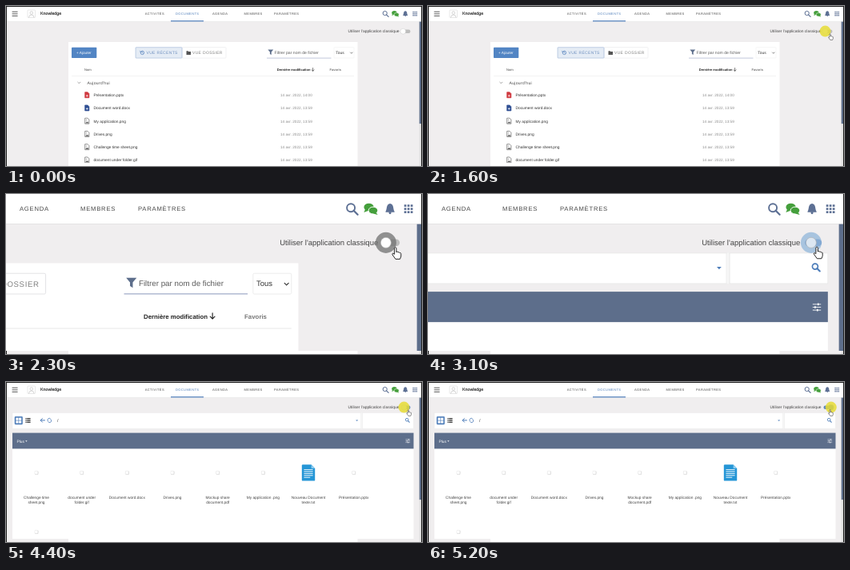
An HTML page for the animation above (6.2 s loop, 520 by 200 pixels).

```html
<!DOCTYPE html>
<html lang="fr">
<head>
<meta charset="utf-8">
<title>Documents</title>
<style>
html, body { margin: 0; width: 100%; height: 100%; overflow: hidden; background: #f0eeef; }
svg { display: block; width: 520px; height: 200px; }
text { font-family: "Liberation Sans", Arial, sans-serif; white-space: pre; text-rendering: geometricPrecision; }
.line { fill: none; stroke-linecap: round; stroke-linejoin: round; }
</style>
</head>
<body>
<svg id="stage" viewBox="0 0 520 200" xmlns="http://www.w3.org/2000/svg"></svg>
<script>
const SLATE = '#5d6e8b', BLUE = '#4c7cb9', INK = '#333', ICON = '#5d7094', PAGE = '#f0eeef';

const rect = (x, y, w, h, fill, more = '') =>
  `<rect x="${x}" y="${y}" width="${w}" height="${h}" fill="${fill}" ${more}/>`;
const dot = (x, y, r, fill, more = '') => `<circle cx="${x}" cy="${y}" r="${r}" fill="${fill}" ${more}/>`;
const text = (x, y, size, s, fill = INK, more = '') =>
  `<text x="${x}" y="${y}" font-size="${size}" fill="${fill}" ${more}>${s}</text>`;
const line = (d, color, w = 0.6) => `<path class="line" d="${d}" stroke="${color}" stroke-width="${w}"/>`;
const shape = (d, fill, more = '') => `<path d="${d}" fill="${fill}" ${more}/>`;
const box = (x, y, w, h, fill, stroke) =>
  rect(x, y, w, h, fill, `rx="0.8" stroke="${stroke}" stroke-width="0.5"`);
const spaced = n => `letter-spacing="${n}"`;
const lens = (x, y, r, color, w) =>
  line(`M${x + r * 0.7} ${y + r * 0.7}l${r} ${r}`, color, w * 1.2) +
  dot(x, y, r, 'none', `stroke="${color}" stroke-width="${w}"`);

function header() {
  let s = rect(0, 0, 520, 19.3, '#fff') + rect(0, 19.3, 520, 0.4, '#e0e0e0');
  for (const y of [7.2, 9.8, 12.4]) s += line(`M8 ${y}h6.2`, '#333', 0.8);
  s += box(27, 5, 9.5, 9.5, '#fff', '#d0d0d0') + dot(31.8, 8.6, 1.8, 'none', 'stroke="#aaa" stroke-width=".5"') +
    line('M28.6 14q0-3 3.2-3t3.2 3', '#aaa', 0.5);
  s += text(43, 11.4, 5.3, 'Knowledge', '#222', 'stroke="#222" stroke-width=".15"');
  const tabs = [[173.7, 'ACTIVITÉS'], [212, 'DOCUMENTS'], [258, 'AGENDA'], [297.6, 'MEMBRES'], [335.1, 'PARAMÈTRES']];
  for (const [x, name] of tabs)
    s += text(x, 11, 4, name, name === 'DOCUMENTS' ? BLUE : '#4a4a4a', spaced(0.4));
  s += rect(206, 18.2, 41, 1.2, BLUE);
  s += lens(473.7, 9, 2.6, ICON, 1);
  s += '<g fill="#459f3c"><ellipse cx="485.4" cy="8.6" rx="3.2" ry="2.5"/><path d="M483 10l-.8 2 2.6-1z"/>' +
    '<ellipse cx="488.2" cy="10.7" rx="3" ry="2.3" stroke="#fff" stroke-width=".5"/><path d="M490 12l1.2 1.5-3-.7z"/></g>';
  s += shape('M499.2 6.3c-2.800.5-1.700 3.500-2.900 5.100v.5h5.800v-.5c-1.200-1.600-.1-4.600-2.900-5.100z', ICON) +
    dot(499.2, 12.3, 0.8, ICON);
  for (let i = 0; i < 9; i++)
    s += rect(508.4 + i % 3 * 2.1, 6.9 + (i / 3 | 0) * 2.1, 1.4, 1.4, ICON);
  return s + text(427.4, 33.3, 4.95, 'Utiliser l\'application classique', '#444');
}

function fileIcon(y, color, photo) {
  let s = shape(`M98.7 ${y - 3.5}h3.4l1.8 1.8v5.2h-5.2z`, photo ? '#fff' : color,
    `stroke="${color}" stroke-width=".7"`);
  return s + (photo
    ? shape(`M99.3 ${y + 2.8}l1.5-2.3 1 1 .8-.8.8 2.1z`, color) + dot(100.4, y - 1.2, 0.5, color)
    : line(`M100.3 ${y + 1}h2M101.3 ${y}v2`, '#fff', 0.7));
}

function recent() {
  let s = rect(78, 45, 361.5, 155, '#fff');
  s += rect(82, 51.8, 31.3, 13.3, '#5285c4', 'rx="0.8"') + text(88, 60.1, 4.7, '+ Ajouter', '#fff');
  s += box(220, 51.7, 55, 13.4, '#fff', '#e2e2e4') + box(162, 51.7, 58, 13.4, '#e5ecf5', '#8aa6cf');
  s += dot(170.4, 58.4, 2.2, 'none', `stroke="${BLUE}" stroke-width=".7"`) +
    line('M170.4 57v1.5l1 .6M167.5 56.2l.5 1.6 1.5-.4', BLUE, 0.5);
  s += text(175.5, 60.2, 5, 'VUE RÉCENTS', '#6f90bf', spaced(0.33));
  s += shape('M225.5 56.3h2l.7.8h2.8v3.9h-5.5z', '#555') + text(233, 60.2, 5, 'VUE DOSSIER', '#808080', spaced(0.33));
  s += shape('M327.4 54.6h6.8l-2.5 3v3.5l-1.8-1.2v-2.3z', SLATE);
  s += text(335.6, 60, 5.1, 'Filtrer par nom de fichier', '#5c5c5c') + rect(326, 64.8, 80.5, 0.5, '#8593b8');
  s += box(410, 51.7, 25, 13.4, '#fff', '#ececec') + text(412.2, 60.1, 4.95, 'Tous') +
    line('M430.5 58l1.3 1.3 1.3-1.3', INK);
  s += text(98, 81, 4.1, 'Nom', '#444');
  s += text(338.8, 81, 4.05, 'Dernière modification', '#222', 'font-weight="bold"') +
    line('M383.6 77.5v3.8m-1.500-1.500l1.500 1.500 1.500-1.500', '#222');
  s += text(404.4, 81, 4.1, 'Favoris', '#777', 'font-weight="bold"') + rect(82, 87.3, 353, 0.4, '#e0e0e0');
  s += line('M89.8 95.2l1.500 1.500 1.500-1.500', '#666') + text(101.5, 97.8, 5.1, 'Aujourd\'hui', '#444', spaced(0.28));
  const rows = [
    ['Présentation.pptx', '14:00', '#d0383f'],
    ['Document word.docx', '13:59', '#2f4f93'],
    ['My application.png', '13:59'], ['Drives.png', '13:59'],
    ['Challenge time sheet.png', '13:59'], ['document under folder.gif', '13:59']
  ];
  rows.forEach(([name, hour, color], i) => {
    const y = 111.2 + i * 16.25;
    s += fileIcon(y, color || '#666', !color) + text(109.5, y + 1.8, 4.85, name, '#333') +
      text(343, y + 1.9, 4.65, `14 avr. 2022, ${hour}`, '#8a8a8a');
  });
  return s;
}

function classic() {
  let s = rect(8, 38.5, 501.5, 19.8, '#fff', 'stroke="#e6e6e6" stroke-width=".4"');
  s += rect(443.3, 38.5, 0.4, 19.8, '#e0e0e0') + rect(443.7, 38.3, 1.6, 20.2, '#f6f6f6') +
    rect(445.3, 38.5, 0.4, 19.8, '#e0e0e0');
  s += box(11, 43.3, 9.6, 9.6, BLUE, BLUE);
  for (let i = 0; i < 4; i++) s += rect(12.4 + i % 2 * 3.7, 44.7 + (i >> 1) * 3.7, 3.1, 3.1, '#fff');
  for (const y of [45.7, 48, 50.3]) s += rect(24.4, y - 0.7, 1.3, 1.4, '#444') + rect(26.2, y - 0.7, 4.4, 1.4, '#444');
  s += line('M48.5 47.9h-5.3m2.3-2.3l-2.3 2.3 2.3 2.3', BLUE, 1);
  s += line('M52.2 48.7a2.2 2.2 0 0 1 3.8-2.3M56.4 47.3a2.2 2.2 0 0 1-3.8 2.3', BLUE, 0.8);
  s += text(64, 50, 5.3, '/') + shape('M437.2 47.4h3l-1.5 1.7z', BLUE) + lens(501.2, 47.2, 1.8, BLUE, 0.9);
  s += rect(8, 83, 501.5, 117, '#fff') + rect(8, 63.6, 501.5, 19.8, SLATE);
  s += text(13.5, 75.8, 4.9, 'Plus', '#fff') + shape('M24.2 73.3h2.4l-1.2 1.4z', '#fff');
  [71.8, 73.7, 75.6].forEach((y, i) => {
    s += line(`M499.8 ${y}h5`, '#fff', 0.45) + rect([502.8, 500.8, 502.3][i], y - 0.7, 0.8, 1.4, '#fff');
  });
  const files = [['Challenge time', 'sheet.png'], ['document under', 'folder.gif'], ['Document word.docx'], ['Drives.png'],
    ['Mockup share', 'document.pdf'], ['My application .png'], ['Nouveau Document', 'texte.txt'], ['Présentation.pptx']];
  const blank = (x, y) => rect(x - 2, y - 1.7, 4.4, 4.2, '#d4d4d4', 'rx=".7"') +
    rect(x - 2.1, y - 2, 3.9, 3.9, '#fff', 'rx=".7" stroke="#dedede" stroke-width=".4"');
  files.forEach((names, i) => {
    const x = 38 + i * 56.67;
    s += i === 6 ? note(x) : blank(x, 113.3);
    names.forEach((n, k) => s += text(x, 146 + k * 5.5, 4.8, n, '#444', 'text-anchor="middle"'));
  });
  return s + blank(38, 187.3);
}

function note(x) {
  let s = shape(`M${x - 8.2} 104.5q0-1.2 1.2-1.2h10.6l4.6 4.6v14.5q0 1.2-1.2 1.2h-14q-1.2 0-1.2-1.2z`, '#2596d6') +
    shape(`M${x + 3.6} 103.3v4.6h4.6z`, '#8ccbf0');
  for (let i = 0; i < 5; i++) s += line(`M${x - 5.2} ${109.6 + i * 2.4}h${i === 4 ? 7 : 10.4}`, '#fff', 0.9);
  return s;
}

const scrollbar = rect(516.7, 19.6, 3.3, 180.4, '#e2e2e2') + rect(516.7, 19.6, 3.3, 127.5, SLATE);

const hand = shape('M0 .6C.1-.3 1.4-.3 1.5.6V3.6l.3-.4q.8-.2 1 .5.9-.4 1.2.4.9-.2 1.1.6v2.2L4.3 8.9H.9L-1.5 5.5q-.3-.9.5-1L0 5.2z',
  '#fff', 'stroke="#222" stroke-width=".6" stroke-linejoin="round" transform="scale(.85)"');
const arrow = shape('M0 0v8.2l1.9-1.7 1.3 3 1.4-.6-1.3-2.9h2.7z', '#222', 'stroke="#fff" stroke-width=".6"');

// The zoomed view leaves the last column and the bottom strip alone.
document.getElementById('stage').innerHTML =
  '<clipPath id="view"><rect width="519" height="196"/></clipPath>' +
  rect(0, 0, 520, 200, PAGE) + rect(78, 196, 361.5, 4, '#fff') + rect(516.7, 196, 2.3, 4, '#e2e2e2') +
  `<g clip-path="url(#view)"><g id="zoom">${rect(0, 0, 520, 200, PAGE)}` +
  `${header()}<g id="recent">${recent()}</g><g id="classic">${classic()}</g>${scrollbar}` +
  rect(494.5, 29.4, 11, 4.6, '#c2c2c2', 'id="track" rx="2.3"') +
  dot(0, 31.7, 6.8, 'none', 'id="ripple" opacity=".75"') +
  dot(0, 31.7, 3.4, '#fff', 'id="knob" stroke="#aaa" stroke-width=".3"') +
  dot(0, 31.6, 7, '#e6dc35', 'id="glow"') + '</g></g>' +
  rect(0, 196, 1, 4, '#222') + rect(519, 0, 1, 200, '#222') +
  `<g id="edge">${rect(0, 0, 1, 196, '#222')}${rect(0, 0, 519, 1, '#222')}</g>` +
  `<g id="cursor"><g id="arrow">${arrow}</g><g id="hand">${hand}</g></g>`;

// time, zoom, classic page, pointer, pointer x, y, knob x, ripple, glow
const steps = [
  [0, 1, 0, '', 0, 0, 496.3, '', 0],
  [200, 1, 0, 'arrow', 512, 187, 496.3, '', 0],
  [400, 1, 0, 'arrow', 461, 121, 496.3, '', 0],
  [600, 1, 0, 'arrow', 474, 84, 496.3, '', 0],
  [800, 1, 0, 'arrow', 490, 53, 496.3, '', 0],
  [1000, 1, 0, 'arrow', 502, 34.6, 496.3, '', 0],
  [1200, 1, 0, 'hand', 502, 34.8, 496.5, '', 0.4],
  [1400, 1, 0, 'hand', 502, 34.8, 496.5, '', 0.65],
  [1600, 1, 0, 'hand', 502, 34.8, 496.5, '', 0.85],
  [1800, 1.465, 0, 'hand', 502, 34.8, 496.4, '#707070', 0],
  [2300, 1.92, 0, 'hand', 502, 34.8, 496.5, '#707070', 0],
  [3100, 1.92, 1, 'hand', 501.7, 34.5, 498.6, '#90b5d9', 0],
  [3900, 1.465, 1, 'hand', 501.7, 34.5, 498.2, '#90b5d9', 0],
  [4400, 1, 1, 'hand', 502.2, 34.8, 497.5, '', 0.85],
  [4600, 1, 1, 'hand', 502, 34.8, 502.5, '', 0.85],
  [4800, 1, 1, 'hand', 502, 34.8, 503.8, '', 0.85]
];
const LOOP = 6200;
const el = id => document.getElementById(id);
const set = (id, attrs) => { for (const k in attrs) el(id).setAttribute(k, attrs[k]); };
const show = (id, on) => set(id, { visibility: on ? 'visible' : 'hidden' });

function render([, z, isClassic, pointer, x, y, knob, ripple, glow]) {
  set('zoom', { transform: `translate(${520 * (1 - z)} 0) scale(${z})` });
  show('recent', !isClassic);
  show('classic', isClassic);
  show('edge', z === 1);
  show('arrow', pointer === 'arrow');
  show('hand', pointer === 'hand');
  set('cursor', { transform: `translate(${520 - (520 - x) * z} ${y * z}) scale(${z})` });
  set('track', { fill: isClassic ? '#5f88bf' : '#bdbdbd' });
  set('knob', { cx: knob, fill: knob > 500 ? BLUE : isClassic ? '#dce7f2' : '#fff' });
  set('ripple', { cx: knob, fill: ripple || 'none' });
  set('glow', { cx: knob, opacity: glow });
}

const start = performance.now();
let shown;
function tick(now) {
  const t = Math.max(0, now - start) % LOOP;
  const step = steps.findLast(s => s[0] <= t);
  if (step !== shown) render(shown = step);
  requestAnimationFrame(tick);
}
tick(start);
</script>
</body>
</html>
```
